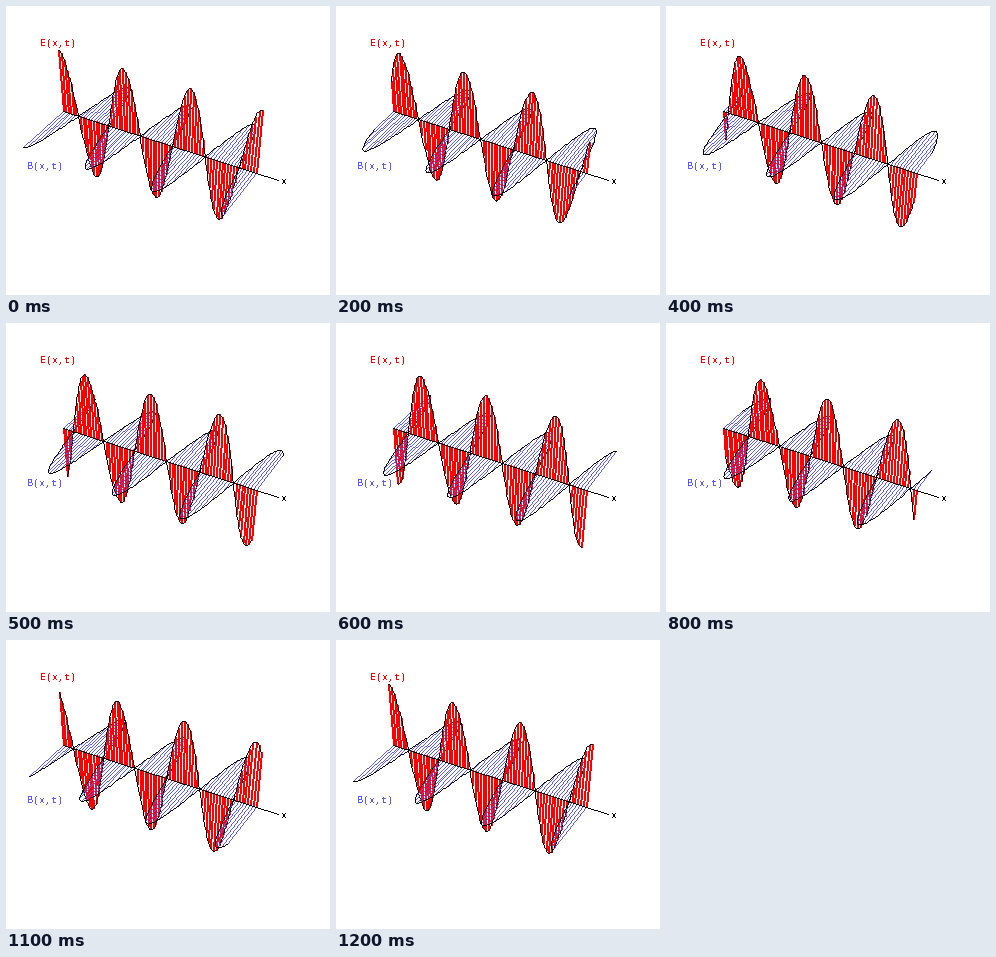
A matplotlib script that plays this animation: 324 by 289 pixels, repeating every 1300 ms.

```python
import numpy as np
import matplotlib.pyplot as plt
from matplotlib.animation import FuncAnimation

W, H, DPI = 324, 289, 100
FRAMES, STEPS, WAVES = 13, 12, 3
LINES, SUB = 72, 3
RED, BLUE, BLACK = (255, 0, 0), (90, 90, 255), (0, 0, 0)

plt.rcParams["text.hinting"] = "native"
plt.rcParams["text.hinting_factor"] = 1

# Perspective camera: homogeneous columns for origin, x, E and B
CAMERA = np.array([
    [57.0, 173.0, -7.4, -40.4],
    [105.0, 48.6, -63.5, 29.7],
    [1.0, -0.08, -0.05, -0.045],
])


def project(x, e=0.0, b=0.0):
    x, e, b = np.broadcast_arrays(x, e, b)
    u, v, w = np.tensordot(CAMERA, np.stack([np.ones_like(x), x, e, b]), 1)
    return np.stack([u / w, v / w], axis=-1)


def stroke(canvas, p, q, color, width=1):
    """Hard-edged line, one pixel per step along its longer side."""
    p, q = np.rint(p), np.rint(q)
    n = int(np.abs(q - p).max()) + 1
    cols, rows = np.rint(np.linspace(p, q, n)).astype(int).T
    for dx in range(width):
        canvas[rows, cols + dx] = color


X = np.linspace(0, 1, LINES * SUB + 1)
AXIS = project(X)

fig = plt.figure(figsize=(W / DPI, H / DPI), dpi=DPI, facecolor="white")
ax = fig.add_axes([0, 0, 1, 1])
image = ax.imshow(np.full((H, W, 3), 255, np.uint8), extent=(0, W, H, 0),
                  aspect="auto", interpolation="nearest")
ax.axis("off")

for x, y, s, color in [(34, 40, "E(x,t)", RED), (21, 163, "B(x,t)", BLUE),
                       (275, 178, "x", BLACK)]:
    ax.text(x, y, s, color=np.array(color) / 255, family="Liberation Mono",
            size=10 * 72 / DPI, va="baseline", antialiased=False)


def draw(i):
    field = np.cos(2 * np.pi * (WAVES * X - i / STEPS))
    electric, magnetic = project(X, e=field), project(X, b=field)
    canvas = np.full((H, W, 3), 255, np.uint8)

    # From the far end to the near end, so nearer strokes cover farther ones
    for k in range(len(X)):
        if k % SUB == 0:
            stroke(canvas, AXIS[k], magnetic[k], BLUE)
            stroke(canvas, AXIS[k], electric[k], RED, 2)
        if k:
            stroke(canvas, magnetic[k - 1], magnetic[k], BLACK)
            stroke(canvas, electric[k - 1], electric[k], BLACK)
    stroke(canvas, (57, 105), (272, 174), BLACK)
    image.set_data(canvas)
    return [image]


anim = FuncAnimation(fig, draw, frames=FRAMES, interval=100, repeat=True,
                     repeat_delay=0, blit=False)
plt.show()
```
